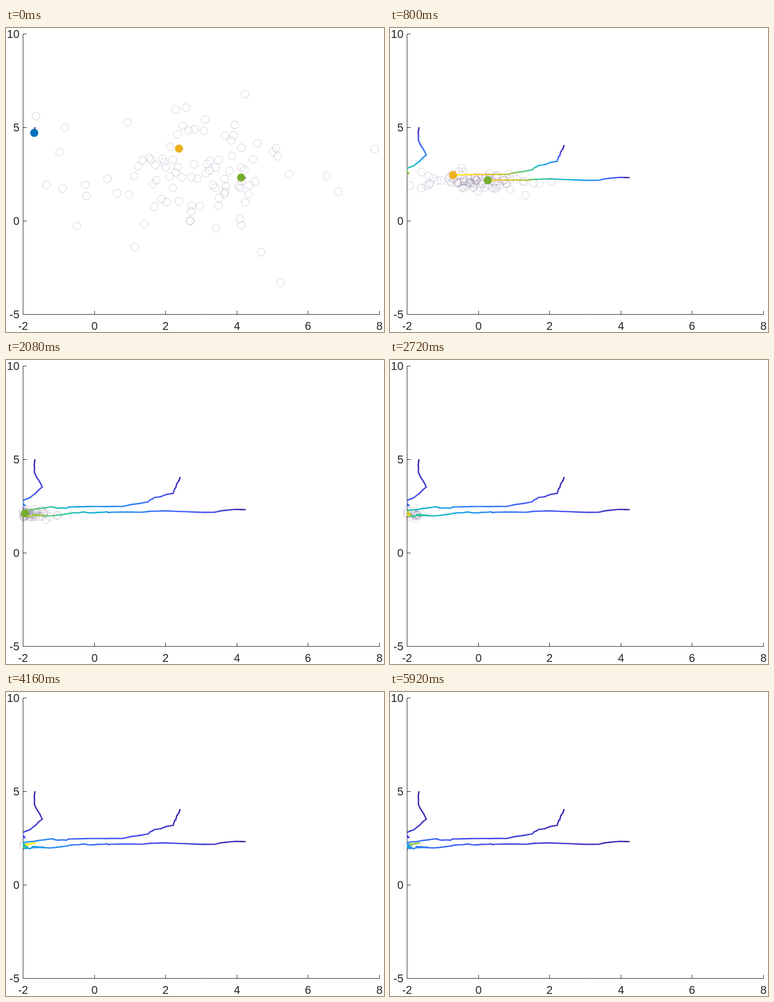
Animation of 719x579 px, one loop 6000 ms. Source, as an HTML page with a canvas:

```html
<!DOCTYPE html>
<html>
<head>
<meta charset="utf-8">
<style>
html, body { margin: 0; width: 100%; height: 100%; overflow: hidden; background: #fff; }
canvas { display: block; }
</style>
</head>
<body>
<canvas id="stage" width="719" height="579"></canvas>
<script>
const ctx = document.getElementById('stage').getContext('2d');
const FRAMES = 75, STEP = 80, LEFT = 32.5, TOP = 11.5, RIGHT = 710.5, BOTTOM = 545.5;
const INK = '#262626';

let seed = 20;
function random() {
  seed = (seed * 1664525 + 1013904223) % 4294967296;
  return seed / 4294967296;
}
const normal = () => Math.sqrt(-2 * Math.log(1 - random())) * Math.cos(2 * Math.PI * random());

// Moves v towards its goal, with noise that settles at the given spread
const relax = (v, goal, keep, spread) => goal + (v - goal) * keep + spread * Math.sqrt(1 - keep * keep) * normal();

// Three vertices per key point, slightly wobbled, then a random drift near the goal;
// a walker passes two vertices per frame
function makePath(keys) {
  const path = [];
  for (let i = 0; i < 2 * FRAMES; i++) {
    const k = Math.floor(i / 3), f = i % 3 / 3, a = keys[k], b = keys[k + 1];
    if (b) {
      const wobble = f ? .7 : 0;
      path.push(a.map((v, axis) => v + (b[axis] - v) * f + wobble * normal()));
    } else {
      const [x, y] = path[i - 1];
      path.push([relax(x, 0, .88, 20), relax(y, 295, .8, 3)]);
    }
  }
  return path;
}

const walkers = [
  { color: '#0072bd', path: makePath([
    [55, 190], [54, 214], [69, 242], [52, 257], [28, 270], [36, 277], [-10, 280]]) },
  { color: '#edb120', path: makePath([
    [331, 224], [323, 243], [318, 254], [282, 262], [271, 270], [222, 279], [174, 279],
    [120, 280], [112, 282], [96, 282], [84, 280], [50, 285], [20, 288]]) },
  { color: '#77ac30', path: makePath([
    [455, 285], [430, 285], [397, 290], [345, 289], [282, 288], [259, 290], [200, 290],
    [186, 290], [157, 291], [128, 291], [117, 293], [84, 297], [46, 295]]) }
];

// A few outliers around a Gaussian cloud
const cloud = [[
  [57, 168], [112, 190], [77, 299], [151, 299], [245, 417], [323, 155],
  [455, 126], [485, 427], [522, 485], [610, 282], [632, 312], [701, 231]
]];
for (let i = 0; i < 85; i++) cloud[0].push([360 + 95 * normal(), 278 + 53 * normal()]);
for (let n = 1; n < FRAMES; n++)
  cloud.push(cloud[n - 1].map(([x, y]) => [relax(x, -22, .925, 25), relax(y, 294, .82, 4.5)]));

const ramp = [[62,38,168], [72,82,244], [46,135,247], [18,177,214], [55,200,151], [171,199,57], [254,195,56], [249,251,21]];
function rampColor(f) {
  const p = f * 7, i = Math.min(6, Math.floor(p));
  return `rgb(${ramp[i].map((v, k) => Math.round(v + (ramp[i + 1][k] - v) * (p - i)))})`;
}

function line(x1, y1, x2, y2) {
  ctx.beginPath();
  ctx.moveTo(x1, y1);
  ctx.lineTo(x2, y2);
  ctx.stroke();
}

function circle([x, y], r) {
  ctx.beginPath();
  ctx.arc(x, y, r, 0, 2 * Math.PI);
}

function drawAxes() {
  ctx.strokeStyle = ctx.fillStyle = INK;
  ctx.lineWidth = 1;
  ctx.lineCap = 'butt';
  ctx.font = '21.33px "Liberation Sans", Arial, sans-serif';
  line(LEFT, TOP - .5, LEFT, BOTTOM + .5);
  line(LEFT, BOTTOM, RIGHT + .5, BOTTOM);
  ctx.textAlign = 'center';
  for (let v = -2; v <= 8; v += 2) {
    const x = Math.round(32 + (v + 2) * 67.8) + .5;
    line(x, BOTTOM, x, BOTTOM - 7);
    ctx.fillText(v, x, 575);
  }
  ctx.textAlign = 'right';
  for (let v = -5; v <= 10; v += 5) {
    const y = BOTTOM - (v + 5) * 35.6;
    line(LEFT, y, LEFT + 7, y);
    ctx.fillText(v, 25.5, y + 7.5);
  }
}

function drawTrail(path, end) {
  for (let i = 1; i <= end; i++) {
    const a = path[i - 1], b = path[i];
    const blend = ctx.createLinearGradient(...a, ...b);
    blend.addColorStop(0, rampColor((i - 1) / end));
    blend.addColorStop(1, rampColor(i / end));
    ctx.strokeStyle = blend;
    line(...a, ...b);
  }
}

function draw(n) {
  const end = 2 * n + 1;
  const inside = p => p[0] >= LEFT;
  ctx.fillStyle = '#fff';
  ctx.fillRect(0, 0, 719, 579);
  drawAxes();

  ctx.strokeStyle = 'rgba(75,55,105,.24)';
  for (const p of cloud[n].filter(inside)) {
    circle(p, 7.4);
    ctx.stroke();
  }

  ctx.save();
  ctx.beginPath();
  ctx.rect(LEFT, TOP, RIGHT - LEFT, BOTTOM - TOP);
  ctx.clip();
  ctx.lineWidth = 2.7;
  ctx.lineCap = 'round';
  for (const w of walkers) drawTrail(w.path, end);
  ctx.restore();

  for (const w of walkers) {
    if (!inside(w.path[end])) continue;
    ctx.fillStyle = w.color;
    circle(w.path[end], 7.7);
    ctx.fill();
  }
}

const origin = performance.now();
function tick() {
  draw(Math.floor((performance.now() - origin) / STEP) % FRAMES);
  requestAnimationFrame(tick);
}
tick();
</script>
</body>
</html>
```
